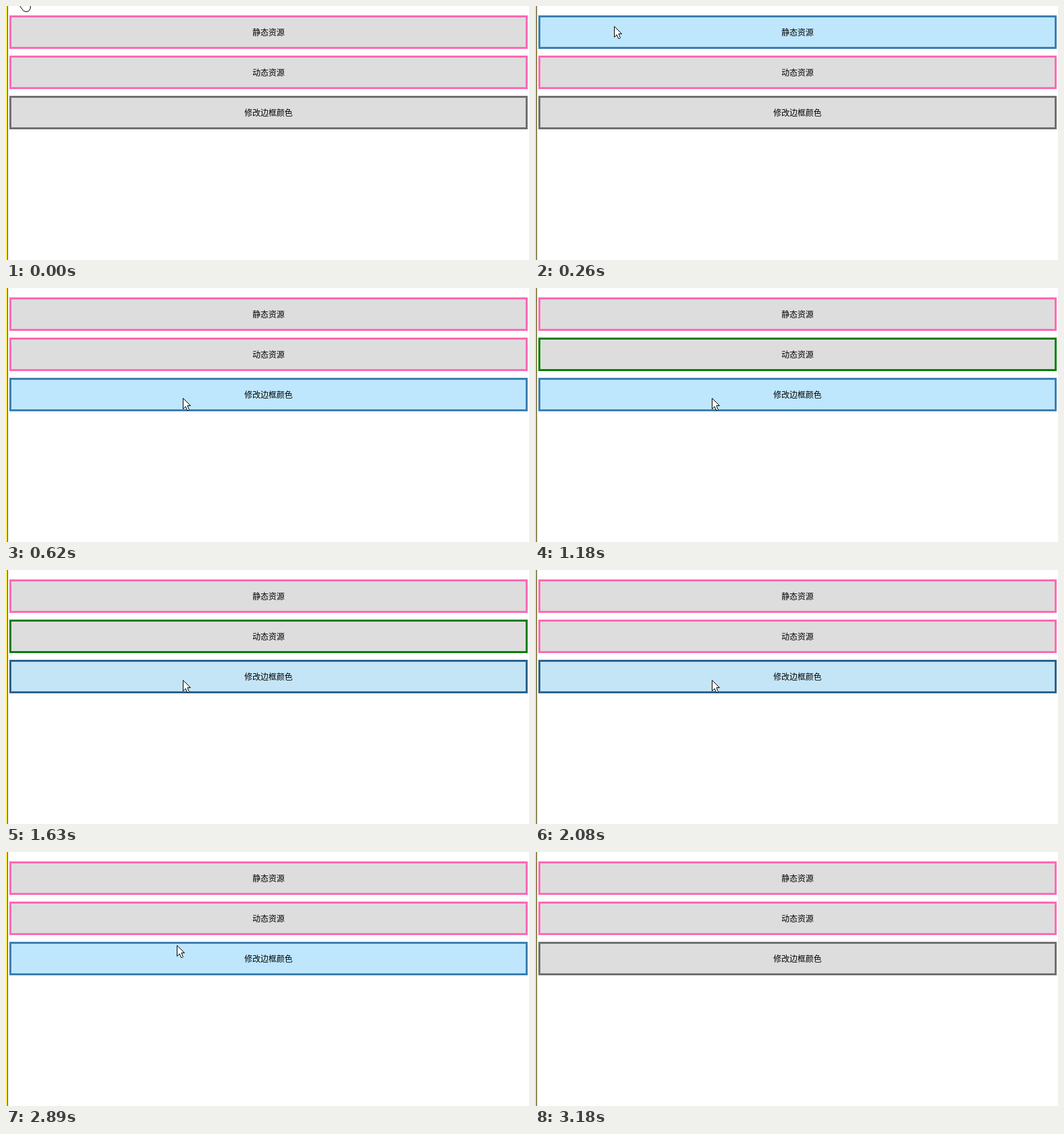
An HTML page that plays this animation: 781 by 379 pixels, repeating every 3.36 s.

```html
<!DOCTYPE html>
<html lang="zh-CN">
<head>
<meta charset="utf-8">
<style>
  html, body { margin: 0; width: 100%; height: 100%; overflow: hidden; background: #fff; }
  svg { display: block; }
  text { font: 12px "Noto Sans CJK SC", "Noto Sans CJK", "Noto Sans CJK JP", sans-serif; text-anchor: middle; }
  .button rect { stroke-width: 3; }
  .cursor path { fill: #fff; stroke: #000; }
</style>
</head>
<body>
<svg width="781" height="379" viewBox="0 0 781 379">
  <rect width="2" height="379" fill="#ffe04a"/>
  <rect x="2" width="1" height="379" fill="#404040"/>
  <g id="buttons"></g>
  <g class="cursor">
    <path id="hand" d="M18.5 -3.5L23.5 4Q26 8.5 30 8.5Q36.5 8.5 36.5 1V-3.5Z"/>
    <path id="arrow" d="M.5 .5V16.5L4.2 12.9L6.6 18.5H8.4L9.4 17.6L7 11.6H11.6Z"/>
  </g>
</svg>
<script>
const LOOP = 3360, HOLD = 90, HOVER_LAG = 0.06;
const TOP = 14, PITCH = 60, HEIGHT = 50;
const NORMAL = "#dddddd", PINK = "#ff69b4", GREEN = "#008000", GRAY = "#707070";
const HOVER = ["#bee6fd", "#3c7fb1"], PRESSED = ["#c4e5f6", "#2c628b"];

// The pointer follows one curve in and one out, in discrete steps.
const enter = { start: 170, end: 620, steps: 5, from: [62, 4], bend: [211, 65], to: [264, 164] };
const leave = { start: 2890, end: 3180, steps: 3, from: [255, 139], bend: [240, 70], to: [180, -40] };
const presses = [1070, 1630, 2080, 2530];

const byId = id => document.getElementById(id);
const hand = byId("hand"), arrow = byId("arrow");

byId("buttons").innerHTML = ["静态资源", "动态资源", "修改边框颜色"].map((label, i) =>
  `<g class="button" transform="translate(5 ${TOP + PITCH * i})">
     <rect x="1.5" y="1.5" width="771" height="${HEIGHT - 3}"/>
     <text x="387" y="30">${label}</text>
   </g>`).join("");
const boxes = document.querySelectorAll(".button rect");

function progress({ start, end, steps }, t) {
  return Math.min(1, Math.floor((t - start) / (end - start) * steps) / steps);
}

function pointOn({ from, bend, to }, p) {
  const q = 1 - p;
  return from.map((a, i) => q * q * a + 2 * p * q * bend[i] + p * p * to[i]);
}

function buttonAt(y) {
  const offset = y - TOP;
  return offset >= 0 && offset % PITCH < HEIGHT ? Math.floor(offset / PITCH) : -1;
}

function draw(t) {
  const inside = t >= enter.start;
  const move = t < leave.start ? enter : leave;
  const p = progress(move, t);
  // Highlighting trails slightly behind the pointer.
  const hovered = inside ? buttonAt(pointOn(move, Math.max(0, p - HOVER_LAG))[1]) : -1;
  const pressed = presses.some(down => t >= down && t < down + HOLD);
  const released = presses.filter(down => t >= down + HOLD).length;
  const borders = [PINK, released % 2 ? GREEN : PINK, GRAY];

  boxes.forEach((box, i) => {
    const [fill, stroke] = i !== hovered ? [NORMAL, borders[i]] : pressed ? PRESSED : HOVER;
    box.setAttribute("fill", fill);
    box.setAttribute("stroke", stroke);
  });
  hand.style.display = inside ? "none" : "";
  arrow.style.display = inside ? "" : "none";
  const [x, y] = pointOn(move, p).map(Math.round);
  arrow.setAttribute("transform", `translate(${x} ${y})`);
}

const start = performance.now();
function frame() {
  draw((performance.now() - start) % LOOP);
  requestAnimationFrame(frame);
}
frame();
</script>
</body>
</html>
```
